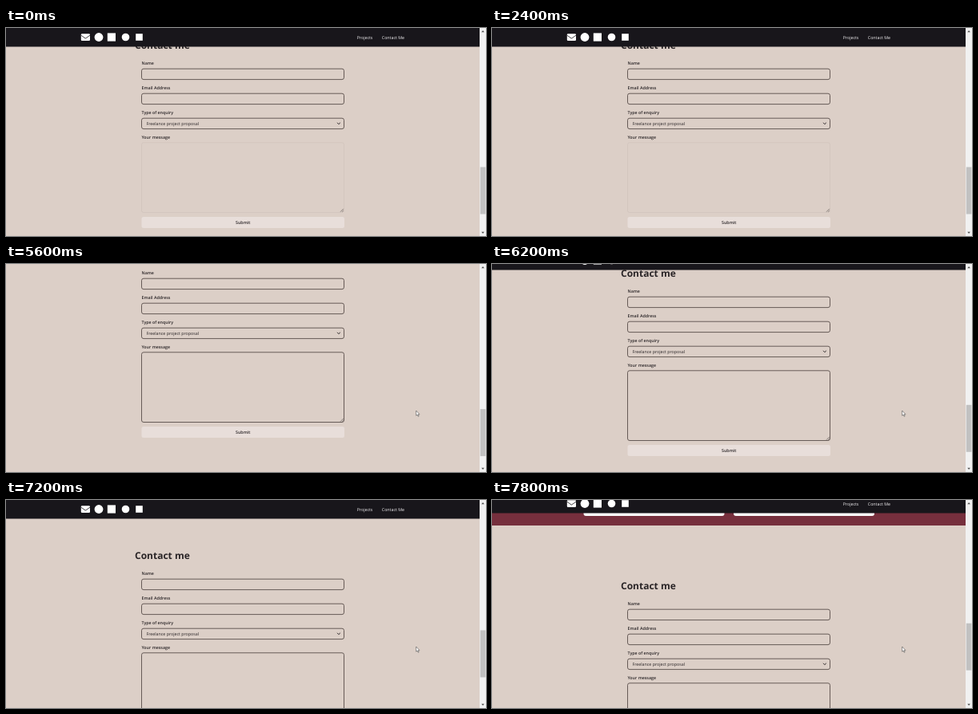
Recreate the animation shown at these times as an HTML page. Size 600 by 261 pixels, loop 8 s.

```html
<!DOCTYPE html>
<html lang="en">
<head>
<meta charset="utf-8">
<title>Contact form</title>
<style>
  html, body { margin: 0; width: 100%; height: 100%; overflow: hidden; background: #dccfc7; }
  svg { display: block; width: 100vw; height: 100vh; }
  text { font: 5.3px "Open Sans", "Noto Sans", sans-serif; fill: #2a2527; text-rendering: geometricPrecision; }
  .label { font-weight: 600; }
  .title { font-size: 12px; font-weight: 700; }
  #nav text { fill: #f4f2f4; }
  .field { fill: none; stroke: #5a4e4b; stroke-width: .9; }
  .mark { fill: none; stroke: #2a2527; }
</style>
</head>
<body>
<svg viewBox="0 0 600 261">
  <rect width="600" height="261" fill="#dccfc7"/>

  <g id="page">
    <rect y="-160" width="592" height="106" fill="#762f3d"/>
    <rect x="114.5" y="-150" width="176" height="84" rx="3" fill="#fff"/>
    <rect x="302" y="-150" width="176" height="84" rx="3" fill="#fff"/>
    <text class="title" x="161" y="26.2">Contact me</text>
    <g id="form"></g>
    <path class="mark" stroke-width="1" d="M414 118.8l1.9 1.9 1.9-1.9"/>
    <text x="175.5" y="121.8">Freelance project proposal</text>
    <rect id="message" class="field" x="169.5" y="143.8" width="253" height="87.7" rx="2.5"/>
    <path class="mark" stroke-width=".5" d="M418 230.7l3.8-3.8M420.2 230.7l1.6-1.6"/>
    <rect x="169.5" y="237" width="253.5" height="14" rx="2.5" fill="#e8deda"/>
    <text class="label" x="296.2" y="246" text-anchor="middle">Submit</text>
  </g>

  <g id="nav">
    <rect width="592" height="23.5" fill="#18161b"/>
    <g fill="#fff">
      <rect x="93.8" y="7.3" width="11.2" height="8.6" rx="1.2"/>
      <path d="M93.8 9.2l5.6 3.9 5.6-3.9" fill="none" stroke="#18161b" stroke-width=".8"/>
      <circle cx="116" cy="11.5" r="5.4"/>
      <rect x="126.8" y="6.4" width="10.2" height="10.2"/>
      <circle cx="149.5" cy="11.5" r="4.8"/>
      <rect x="162.2" y="7.2" width="8.6" height="8.6"/>
    </g>
    <text x="438.7" y="13.7">Projects</text>
    <text x="469.8" y="13.7">Contact Me</text>
  </g>

  <rect x="592" width="8" height="261" fill="#f1f1f1"/>
  <path d="M594.3 5.2l1.8-2.2 1.8 2.2zM594.3 255.8l1.8 2.2 1.8-2.2z" fill="#505050"/>
  <rect id="thumb" x="592.8" width="6.6" height="59"/>
  <path id="cursor" d="M0 0v6.2l1.4-1.2 1 2.3 1-.4-1-2.2h1.9z" fill="#fff" stroke="#333" stroke-width=".5"/>
</svg>

<script>
const LOOP = 8000, STEP = 200;
const $ = id => document.getElementById(id);

$("form").innerHTML = ["Name", "Email Address", "Type of enquiry", "Your message"].map((label, i) => {
  const y = i * 31;
  const box = `<rect class="field" x="169.5" y="${51.2 + y}" width="253" height="13.4" rx="2.5"/>`;
  return `<text class="label" x="169.5" y="${45.7 + y}">${label}</text>` + (i < 3 ? box : "");
}).join("");

// Tracks are [time, value] pairs, joined by straight lines.
const scroll = [[5000, 0], [5200, 6], [5600, 33], [5800, 40], [6000, 40], [6200, 10], [6400, -35],
  [6600, -76], [6800, -91], [7000, -76], [7200, -48], [7400, -20], [7600, -45], [7800, -86]];
const navShift = [[5000, 0], [5200, -6], [5400, -24], [6000, -24], [6200, -16], [6400, 0],
  [7200, 0], [7400, -14], [7600, -24], [7800, -7]];
const cursorX = [[3200, 370], [3400, 430], [4000, 590], [4200, 597], [4400, 567], [4600, 567],
  [4800, 597], [5000, 597], [5200, 512.7]];
const cursorY = [[3200, 190], [4200, 200.5], [5000, 200.5], [5200, 184]];
const border = [[3000, .08], [3400, 1]];

function at(track, t) {
  const i = track.findIndex(([time]) => time >= t);
  if (i < 0) return track[track.length - 1][1];
  if (i === 0) return track[0][1];
  const [t0, a] = track[i - 1], [t1, b] = track[i];
  return a + (b - a) * (t - t0) / (t1 - t0);
}

const move = (id, x, y) => $(id).setAttribute("transform", `translate(${x} ${y})`);

function draw(now) {
  const t = Math.floor(now % LOOP / STEP) * STEP;
  const s = at(scroll, t), x = at(cursorX, t);
  move("page", 0, -s);
  move("nav", 0, at(navShift, t));
  move("thumb", 0, 174.5 + s * .23);
  move("cursor", x, at(cursorY, t));
  $("cursor").style.opacity = t < 3400 ? 0 : 1;
  $("message").style.opacity = at(border, t);
  $("thumb").style.fill = x > 592 ? "#a8a8a8" : "#c1c1c1";
  requestAnimationFrame(draw);
}
requestAnimationFrame(draw);
</script>
</body>
</html>
```
